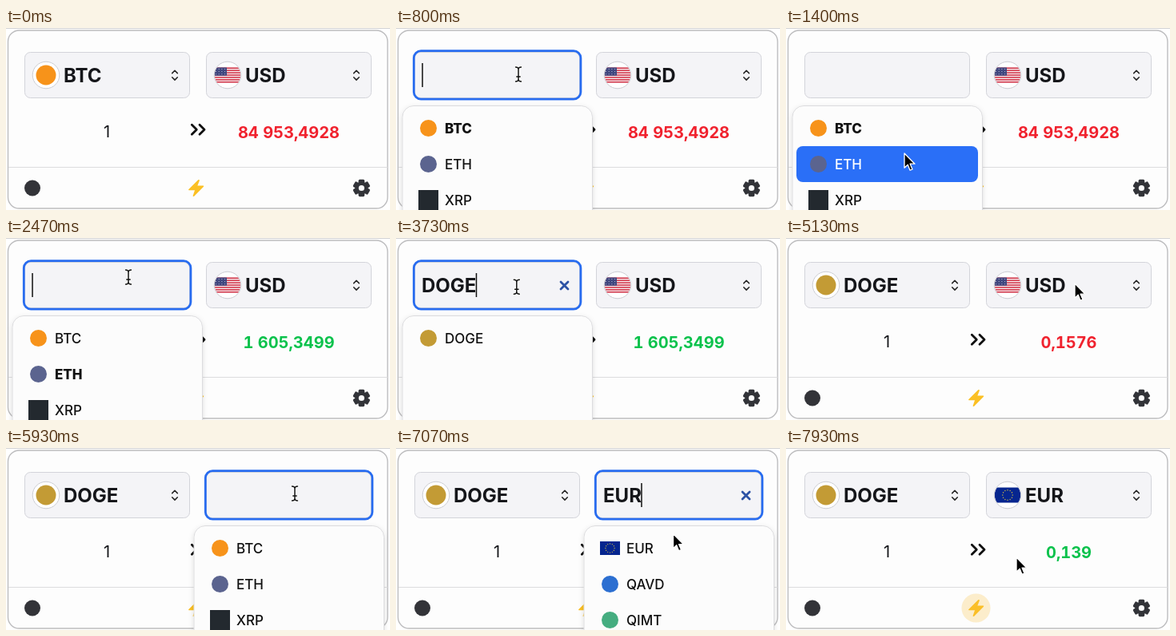
Animation of 480 by 228 pixels, one loop 8000 ms. Source, as an HTML page:

```html
<!DOCTYPE html>
<html lang="en">
<head>
<meta charset="utf-8">
<title>Currency converter</title>
<style>
html, body { margin: 0; width: 100%; height: 100%; overflow: hidden; background: #fff; }
svg { display: block; width: 100%; height: 100%; font-family: Inter, Roboto, sans-serif; }
.field { font-size: 24px; font-weight: 700; fill: #15161a; }
.row { font-size: 17px; font-weight: 500; fill: #111; }
.value { font-size: 20px; font-weight: 700; text-anchor: middle; font-variant-numeric: tabular-nums; }
.line { fill: none; stroke-linecap: round; stroke-linejoin: round; }
</style>
</head>
<body>
<svg id="stage" viewBox="0 0 480 228">
  <defs>
    <clipPath id="round"><circle cx="50" cy="59" r="16.2"/></clipPath>
    <filter id="shadow" x="-10%" y="-10%" width="120%" height="120%">
      <feDropShadow dx="0" dy="2" stdDeviation="3" flood-opacity=".12"/>
    </filter>
  </defs>
  <path d="M0 .5H480" stroke="#d2d2d4"/>
  <rect x="2.5" y="3" width="474.5" height="223" rx="14" fill="#fdfdfd" stroke="#bdbdbf" stroke-width="1.4"/>
  <path d="M3 174.5H477" stroke="#dcdcde"/>
  <g id="scene"></g>
</svg>
<script>
const LOOP = 8000, STEP = 200 / 3, BLINK = 600, OFFSET = 227;
const scene = document.getElementById('scene');
const pen = document.createElement('canvas').getContext('2d');

const assets = [
  { name: 'BTC', color: '#f7931a' },
  { name: 'ETH', color: '#5b648f' },
  { name: 'XRP', color: '#23292f', square: true },
  { name: 'DOGE', color: '#c39b35' },
  { name: 'USD', flag: usFlag },
  { name: 'EUR', flag: euFlag },
  { name: 'QAVD', color: '#2c6fd1', key: 'EUR' },
  { name: 'QIMT', color: '#45ad80', key: 'EUR' }
];
const find = name => assets.find(a => a.name === name);

const selectors = [
  {
    dx: 0,
    picks: [[0, 'BTC'], [1470, 'ETH'], [4000, 'DOGE']],
    sessions: [
      { open: 600, blur: 1400, close: 1470, keys: [] },
      { open: 2400, blur: 3930, close: 4000, keys: [[3000, 'D'], [3130, 'DO'], [3270, 'DOG'], [3400, 'DOGE']] }
    ]
  },
  {
    dx: OFFSET,
    picks: [[0, 'USD'], [7400, 'EUR']],
    sessions: [
      { open: 5330, blur: 7330, close: 7400, keys: [[6330, 'E'], [6530, 'EU'], [6730, 'EUR']] }
    ]
  }
];

const RED = '#f0222e', GREEN = '#0bc24c';
const values = [[-999, '84 953,4928', RED], [1600, '1 605,3499', GREEN], [4130, '0,1576', RED], [7730, '0,139', GREEN]];
const pulses = [1870, 4470, 7870];

// time, x, y of the pointer's hot spot
const path = [
  [0, 385, 236], [600, 153, 58], [1000, 153, 58], [1340, 148, 157], [1530, 148, 157],
  [1800, 156, 95], [2070, 153, 49], [3670, 153, 49], [3900, 140, 121], [4270, 127, 113],
  [4470, 127, 113], [4870, 388, 108], [5130, 361, 57], [6930, 361, 57], [7070, 346.5, 107.5],
  [7270, 338, 124], [7470, 338, 124], [7930, 288, 137], [LOOP, 288, 137]
];

const clamp = v => Math.max(0, Math.min(1, v));
const latest = (list, t) => list.filter(e => e[0] <= t).pop();

function pointer(t) {
  const i = path.findIndex(p => p[0] > t);
  const [t0, x0, y0] = path[i - 1], [t1, x1, y1] = path[i];
  const u = (t - t0) / (t1 - t0), s = u * u * (3 - 2 * u);
  return { x: x0 + (x1 - x0) * s, y: y0 + (y1 - y0) * s };
}

const rect = (x, y, w, h, fill, more = '') =>
  `<rect x="${x}" y="${y}" width="${w}" height="${h}" fill="${fill}" ${more}/>`;
const circle = (x, y, r, fill, more = '') =>
  `<circle cx="${x}" cy="${y}" r="${r}" fill="${fill}" ${more}/>`;
const line = (d, color, width) =>
  `<path class="line" d="${d}" stroke="${color}" stroke-width="${width}"/>`;

function usFlag(cx, cy, w, h) {
  const x = cx - w / 2, y = cy - h / 2, s = h / 13;
  let out = rect(x, y, w, h, '#f7eef0');
  for (let i = 0; i < 13; i += 2) out += rect(x, y + i * s, w, s, '#d02b40');
  out += rect(x, y, w * .47, s * 7, '#41477f');
  for (let i = 0; i < 12; i++)
    out += circle(x + w * (.07 + .11 * (i % 4)), y + s * (1.3 + 2.2 * Math.floor(i / 4)), .5, '#d5d7e8');
  return out;
}

function euFlag(cx, cy, w, h) {
  let out = rect(cx - w / 2, cy - h / 2, w, h, '#06268f');
  for (let i = 0; i < 12; i++) {
    const a = i * Math.PI / 6;
    out += circle(cx + Math.sin(a) * h * .33, cy - Math.cos(a) * h * .33, h * .04, '#c2b048');
  }
  return out;
}

function fieldIcon(a) {
  const mark = a.flag
    ? `<g clip-path="url(#round)">${a.flag(50, 59, 34, 19)}</g>`
    : circle(50, 59, 12.5, a.color);
  return circle(50, 59, 17, '#fff') + mark + circle(50, 59, 16.8, 'none', 'stroke="#cbccd2"');
}

function rowIcon(a, cy) {
  if (a.flag) return a.flag(40.5, cy, 25, 17);
  return a.square ? rect(28, cy - 12.5, 25, 25, a.color) : circle(40.5, cy, 10.5, a.color);
}

function panel(list, picked, hover, opacity) {
  const rows = list.slice(0, 3).map((a, i) => {
    const cy = 125.5 + 45 * i, on = i === hover;
    return (on ? rect(13, cy - 22.5, 227, 45, '#2a6ff7', 'rx="8"') : '') + rowIcon(a, cy) +
      `<text class="row" x="61" y="${cy + 6}" style="${a.name === picked ? 'font-weight:800;' : ''}${on ? 'fill:#fff' : ''}">${a.name}</text>`;
  });
  return `<g opacity="${opacity}">` +
    rect(8, 97.5, 237.5, 190, '#fcfcfc', 'rx="14" stroke="#dcdcde" filter="url(#shadow)"') +
    rows.join('') + '</g>';
}

function selector(s, t, p) {
  const picked = latest(s.picks, t)[1];
  const ses = s.sessions.filter(e => t >= e.open && t < e.close + 200).pop();
  const open = !!ses && t < ses.close, focus = open && t < ses.blur;
  let field = rect(23.5, 30.5, 206, 57, '#f4f4f7', 'rx="7" stroke="#d3d4da"'), list = '';

  if (open) {
    const [since, typed] = latest(ses.keys, t) || [ses.open, ''];
    field += `<text class="field" x="32" y="68">${typed}</text>`;
    if (focus) {
      field += rect(22.3, 28.6, 208.6, 60.6, 'none', 'rx="9" stroke="#286cf0" stroke-width="2.8"');
      pen.font = '700 24px Inter, Roboto, sans-serif';
      const x = typed ? 32 + pen.measureText(typed).width : 33;
      if ((t - since) % (2 * BLINK) < BLINK) field += rect(x - .7, 44, 1.5, 30, '#111');
    }
    if (typed) field += line('M206 55l9 9m0-9l-9 9', '#2c52a5', 2.8);
  } else {
    field += fieldIcon(find(picked)) + `<text class="field" x="72" y="68">${picked}</text>` +
      line('M207.7 56.6l3.3-3.3 3.3 3.3M207.7 61.8l3.3 3.3 3.3-3.3', '#222', 1.5);
  }

  if (ses) {
    const typed = (latest(ses.keys, Math.min(t, ses.close)) || [0, ''])[1];
    const found = assets.filter(a => (a.key || a.name).startsWith(typed));
    const over = open && p.y > 110 && p.x > s.dx + 8 && p.x < s.dx + 245;
    const hover = over ? Math.floor((p.y - 103) / 45) : -1;
    const opacity = open ? clamp((t - ses.open + 66) / 133) : clamp(.75 - (t - ses.close) / 200);
    list = panel(found, picked, hover, opacity);
  }
  const group = body => `<g transform="translate(${s.dx})">${body}</g>`;
  return { open, field: group(field), list: group(list) };
}

function bolt(t) {
  const start = pulses.filter(e => e <= t).pop();
  const n = start === undefined ? 9 : Math.round((t - start) / STEP);
  const [r, a] = [[12, .93], [18, .25], [18.4, .16], [18.4, .07]][n] || [0, 0];
  return `<path d="M240.2 190.3L228.2 202.3Q227.6 203.3 229 203.3H236L233.6 210.2Q233.9 211.6 235.2 210.8L247 198.8Q247.7 197.7 246.4 197.6H239.4L241.9 191Q241.6 189.4 240.2 190.3Z" fill="#fbc024"/>` +
    circle(237.5, 200.5, r, '#f6bb35', `opacity="${a}"`);
}

function gear() {
  const teeth = [0, 60, 120].map(a =>
    rect(440.6, 189.8, 7.6, 21.4, '#333439', `rx="1.6" transform="rotate(${a} 444.4 200.5)"`));
  return teeth.join('') + circle(444.4, 200.5, 8, '#333439') + circle(444.4, 200.5, 3.6, '#fdfdfd');
}

function cursor(kind, { x, y }) {
  const beam = 'M-3.5-9Q0-9 0-6V6Q0 9-3.5 9M3.5-9Q0-9 0-6M0 6Q0 9 3.5 9M-2.2 3H2.2';
  const shapes = {
    arrow: '<path d="M0 0V18.2L4.2 14.3 7 21.2 10 20 7.1 13.2H13Z" fill="#000" stroke="#fff" stroke-width="1.3" stroke-linejoin="round"/>',
    beam: line(beam, '#fff', 3.2) + line(beam, '#111', 1.5),
    hand: '<path d="M-3.8 1.8C-3.8-.5-.4-.5 0 1.8L1.2 8C2 6.4 4.4 6.6 4.9 8.4 5.8 7.2 7.8 7.6 8.3 9.4 9.6 8.4 11.4 9.2 11.4 11V16C11.4 18.4 9.8 19.6 9.6 23.2H-.6C-.8 20.4-4.4 17.6-6.4 13.4-7.2 11.4-4.8 10.4-3.4 12L-1.8 13.6Z" fill="#fff" stroke="#111" stroke-width="1.4" stroke-linejoin="round"/>' +
      line('M2.2 15.5V19.5M5 15.5V19.5M7.8 15.5V19.5', '#111', 1.1)
  };
  return `<g transform="translate(${x} ${y})">${shapes[kind]}</g>`;
}

function draw(t) {
  const p = pointer(t);
  const [left, right] = selectors.map(s => selector(s, t, p));
  const [changed, value, color] = latest(values, t);
  const inField = (left.open && p.x < 230 || right.open && p.x > 250) && p.y > 30 && p.y < 93;
  const inAmount = !left.open && p.x < 205 && p.y > 104 && p.y < 150;
  const kind = inField ? 'beam' : inAmount ? 'hand' : 'arrow';

  scene.innerHTML = left.field + right.field +
    '<text x="126" y="137" font-size="20" text-anchor="middle" fill="#15161a">1</text>' +
    line('M232.3 121.2l6 6-6 6M242 121.2l6 6-6 6', '#111', 2.8) +
    `<text class="value" x="353.5" y="137.5" fill="${color}" opacity="${clamp((t - changed + 66) / 200)}">${value}</text>` +
    circle(33, 200.5, 10, '#333439') + bolt(t) + gear() +
    left.list + right.list + (t > 0 ? cursor(kind, p) : '');
}

let shown = -1;
function tick(now) {
  const step = Math.floor((now % LOOP + 4) / STEP) % (LOOP / STEP);
  // times are kept on a 10 ms grid
  if (step !== shown) draw(Math.round((shown = step) * STEP / 10) * 10);
  requestAnimationFrame(tick);
}
draw(0);
requestAnimationFrame(tick);
</script>
</body>
</html>
```
